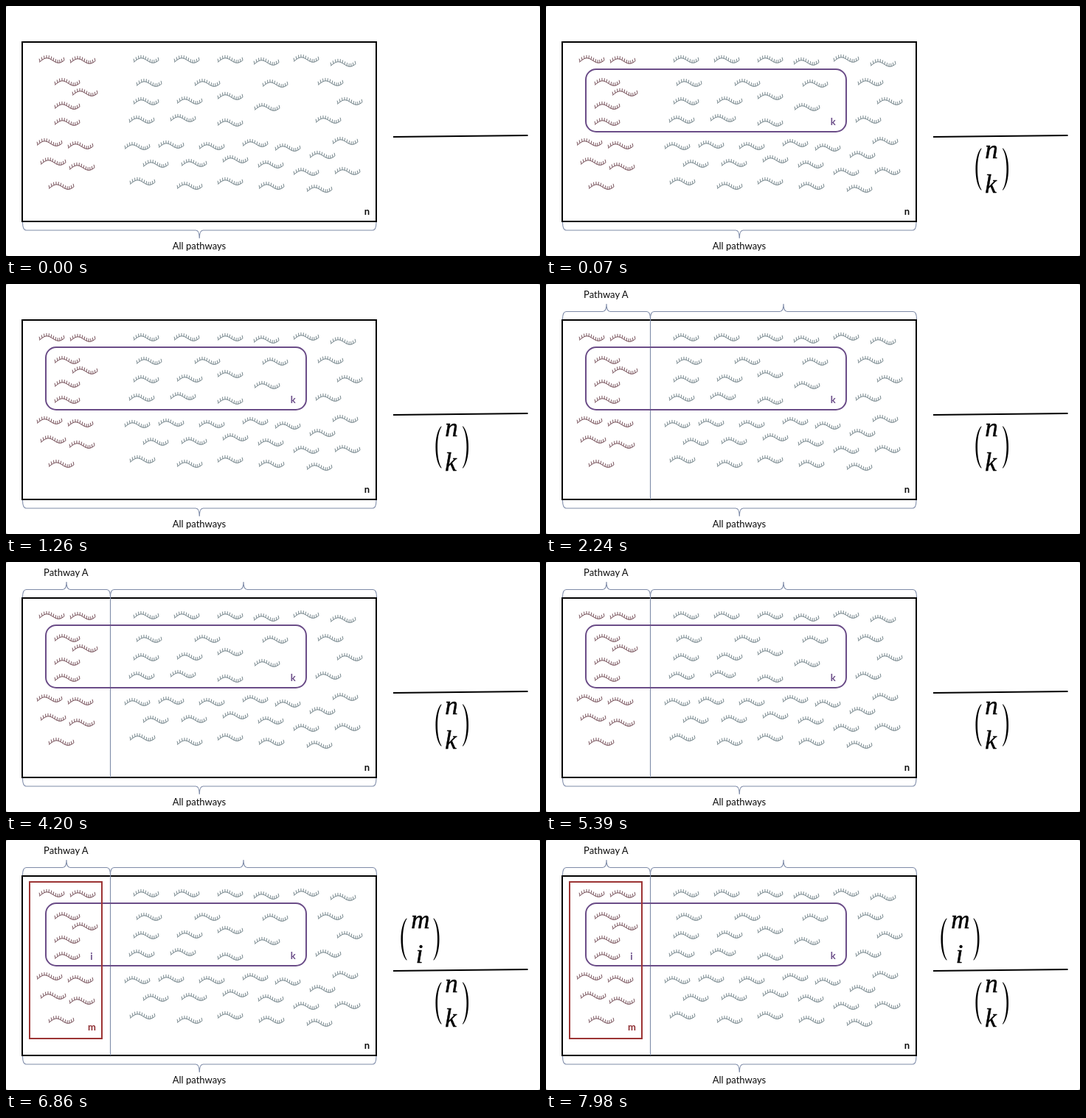
These frames come from a looping animation (724x340 px, 8 s). An HTML page:

```html
<!DOCTYPE html>
<html lang="en">
<head>
<meta charset="utf-8">
<title>Pathway combinations</title>
<style>
  html, body { margin: 0; width: 100%; height: 100%; overflow: hidden; background: #fff; }
  svg { display: block; width: 724px; height: 340px; }
  text { font: 13px Lato, "Open Sans", sans-serif; text-anchor: middle; fill: #0c0c0c; }
  .tag { font-weight: 700; }
  .math { font: italic 35px "Liberation Serif", "Noto Serif", serif; stroke: #000; stroke-width: .45px; fill: #000; }
  .line { fill: none; stroke-width: 2; }
  .brace { fill: none; stroke: #7e8ba8; stroke-width: 1.1; }
  .violet { stroke: #6b4d88; }
  .red { stroke: #9c3434; }
  text.violet { fill: #6b4d88; stroke: none; }
  text.red { fill: #8c2a2e; stroke: none; }
  .strand { fill: none; stroke-width: .9; }
</style>
</head>
<body>
<svg viewBox="0 0 724 340">
  <rect width="724" height="340" fill="#b4b4b4"/>
  <rect width="724" height="340" rx="3" fill="#fff"/>

  <g id="strands"></g>
  <rect class="line" x="22" y="49" width="480" height="244" stroke="#000"/>
  <text class="tag" x="489.3" y="284">n</text>
  <path class="brace" id="whole"/>
  <text x="262" y="330.5">All pathways</text>
  <path class="line" d="M525 178L707.5 176" stroke="#000"/>

  <g data-at="2240">
    <path class="brace" id="left"/>
    <path class="brace" id="right"/>
    <path class="brace" d="M141.5 48V293"/>
    <text x="81.3" y="18.5">Pathway A</text>
  </g>

  <g data-at="70">
    <rect class="line violet" x="54" y="86" width="353" height="85" rx="14"/>
    <text class="tag violet" x="389.3" y="162">k</text>
    <g class="parens" transform="translate(582 193)"></g>
    <text class="math" x="604" y="207">n</text>
    <text class="math" x="603" y="253.5">k</text>
  </g>

  <g data-at="5460">
    <rect class="line red" x="32" y="57" width="98" height="213"/>
    <text class="tag red" x="116.5" y="259">m</text>
    <text class="tag violet" x="116" y="163">i</text>
    <g class="parens" transform="translate(535 106)"></g>
    <text class="math" x="562" y="120">m</text>
    <text class="math" x="560.5" y="166.5">i</text>
  </g>
</svg>
<script>
const LOOP = 8000;
const $ = s => document.querySelector(s);

// Strand centres
const inside = [
  [62,73],[104,74],[83,104],[107,118],[83,136],[83,158],
  [59,186],[101,190],[64,212],[103,219],[75,245]
];
const outside = [
  [190,73],[245,73],[304,73],[353,76],[407,72],[457,78],
  [194,105],[273,105],[365,106],[440,104],
  [190,130],[249,129],[304,123],[354,138],[466,130],
  [184,155],[240,153],[304,159],[437,155],
  [178,191],[224,189],[279,191],[338,187],[382,193],[460,184],[429,203],
  [203,215],[255,214],[311,209],[359,216],[407,226],[463,225],
  [185,239],[249,245],[304,239],[360,245],[425,249]
];

// A wave with short teeth standing on it
const wave = x => 1.2 - 3.9 * Math.sin((x + 17) / 34 * Math.PI * 2 - .25) - x * .08;
function strandPath() {
  let d = '';
  for (let x = -17; x <= 17; x++) d += (d ? 'L' : 'M') + x + ' ' + wave(x).toFixed(2);
  for (let x = -16; x <= 17; x += 3) {
    const slope = wave(x + .5) - wave(x - .5);
    d += `M${x} ${wave(x).toFixed(2)}l${(slope * 1.2).toFixed(2)} -4`;
  }
  return d;
}
const shape = strandPath();
const draw = (spots, color) => spots.map(([x, y]) =>
  `<path class="strand" stroke="${color}" transform="translate(${x} ${y})" d="${shape}"/>`).join('');
$('#strands').innerHTML = draw(inside, '#6a414b') + draw(outside, '#687a80');

// Brace from a to b at height y; h is signed towards the tip
function brace(id, a, b, y, h) {
  const mid = (a + b) / 2, flat = y + h / 2, tip = y + h, r = 5;
  $(id).setAttribute('d',
    `M${a} ${y}Q${a} ${flat} ${a + r} ${flat}H${mid - r}Q${mid} ${flat} ${mid} ${tip}` +
    `Q${mid} ${flat} ${mid + r} ${flat}H${b - r}Q${b} ${flat} ${b} ${y}`);
}
brace('#whole', 22.5, 502, 294, 22);
brace('#left', 22.5, 141.5, 48, -21);
brace('#right', 141.5, 502.5, 48, -21);

const paren = 'M8.3 0C-2.2 10 -2.2 48 8.3 58L8.3 56.6C1.2 46 1.2 12 8.3 1.4Z';
for (const g of document.querySelectorAll('.parens')) {
  const width = g.parentNode.dataset.at === '70' ? 45.5 : 53;
  g.innerHTML = `<path d="${paren}"/><path d="${paren}" transform="translate(${width}) scale(-1 1)"/>`;
}

// Each group appears at once and stays until the loop restarts
for (const g of document.querySelectorAll('[data-at]')) {
  const run = g.animate([
    { opacity: 0, offset: 0, easing: 'steps(1, end)' },
    { opacity: 1, offset: (g.dataset.at - 2) / LOOP },
    { opacity: 1, offset: 1 }
  ], { duration: LOOP, iterations: Infinity });
  run.startTime = document.timeline.currentTime;
}
</script>
</body>
</html>
```
